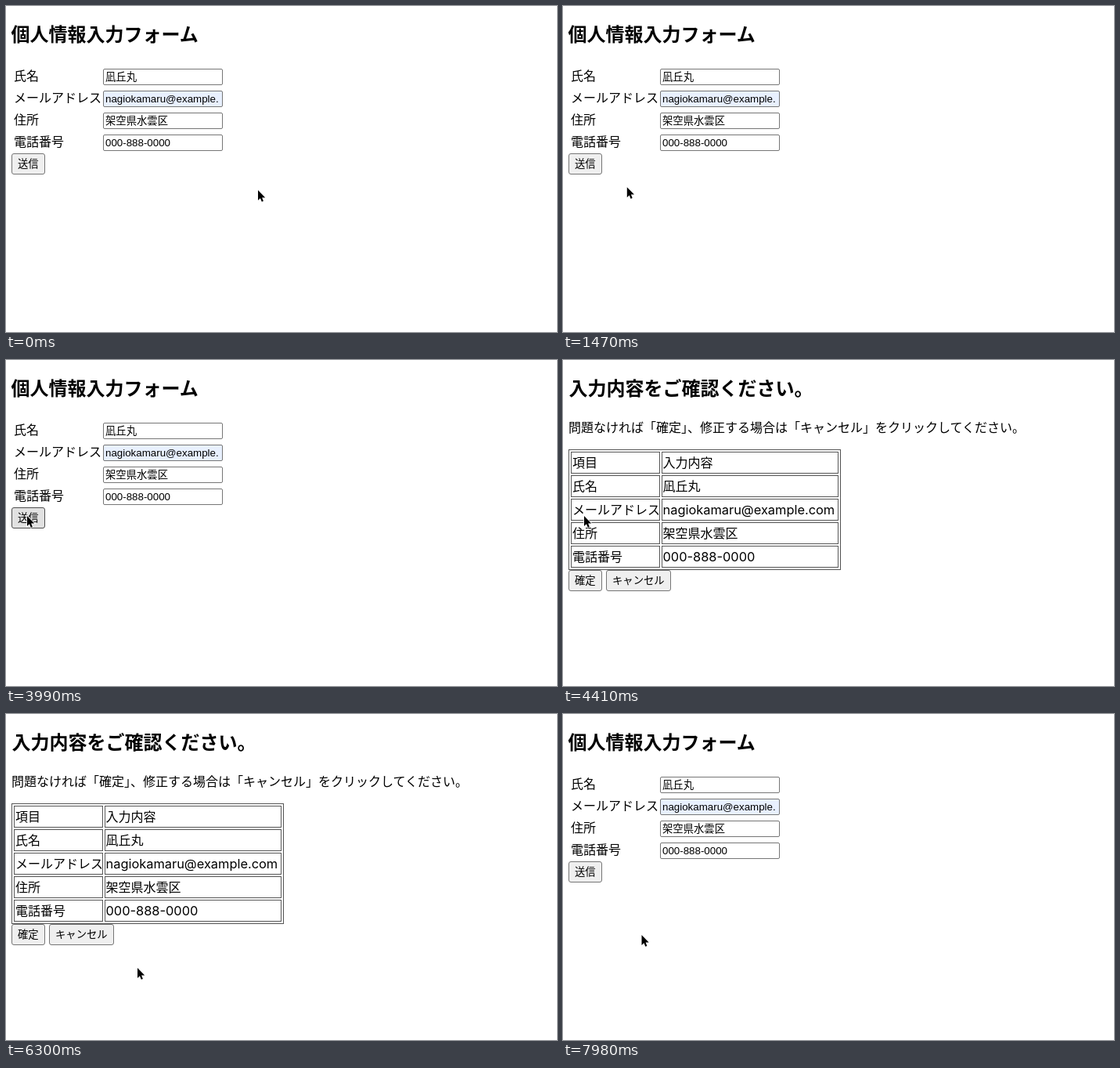
Recreate the animation shown at these times as an HTML page. Size 704 by 416 pixels, loop 8 s.

```html
<!DOCTYPE html>
<html lang="ja">
<head>
<meta charset="utf-8">
<title>個人情報入力フォーム</title>
<style>
html, body { margin: 0; width: 100%; height: 100%; overflow: hidden; background: #fff; }
svg { display: block; width: 704px; height: 416px; }
text { font: 16px "Noto Sans CJK JP", "Noto Sans CJK", sans-serif; white-space: pre; }
.h2 { font-size: 24px; font-weight: 700; }
.ui { font-size: 13.333px; }
.latin { font: 13.333px "Liberation Sans", Arial, sans-serif; }
.wide { font: 16.4px Inter, sans-serif; }
.field { fill: #fff; stroke: #767676; }
.auto { fill: #e8f0fe; }
.button { fill: #efefef; stroke: #767676; }
.hover { fill: #e9e9e9; stroke: #5c5c5c; }
.press { fill: #e1e1e1; stroke: #4f4f4f; }
.cell { fill: none; stroke: #555; }
</style>
</head>
<body>
<svg viewBox="0 0 704 416">
  <g id="form"></g>
  <g id="confirm"></g>
  <path id="cursor" d="M0 0V13L2.9 10.3L4.8 14.8L6.9 13.9L5.1 9.4H9.2Z"
        stroke="#fff" stroke-width="1.6" paint-order="stroke"/>
</svg>
<script>
const LOOP = 8000, STEP = 70;
const $ = id => document.getElementById(id);
const form = $('form'), confirm = $('confirm'), cursor = $('cursor');

function add(parent, tag, attrs, content = '') {
  const el = document.createElementNS('http://www.w3.org/2000/svg', tag);
  for (const key in attrs) el.setAttribute(key, attrs[key]);
  el.textContent = content;
  parent.append(el);
  return el;
}
const text = (parent, x, y, str, cls = '') => add(parent, 'text', { x, y, class: cls }, str);
const box = (parent, x, y, width, height, cls, rx = 0) =>
  add(parent, 'rect', { x: x + .5, y: y + .5, width: width - 1, height: height - 1, rx, class: cls });

function button(parent, x, y, label, pressAt = Infinity) {
  const width = Math.round(label.length * 13.333 + 16);
  const rect = box(parent, x, y, width, 27, 'button', 2.5);
  text(parent, x + 8, y + 18, label, 'ui');
  return { parent, rect, x, y, width, pressAt };
}

const rows = [
  ['氏名', '凪丘丸'],
  ['メールアドレス', 'nagiokamaru@example.com'],
  ['住所', '架空県水雲区'],
  ['電話番号', '000-888-0000']
];
const isLatin = str => /^[\x20-\x7e]+$/.test(str);

text(form, 6.5, 45, '個人情報入力フォーム', 'h2');
rows.forEach(([label, value], i) => {
  const y = 80 + i * 28;
  text(form, 10, y + 15, label);
  box(form, 124, y, 153, 21, i === 1 ? 'field auto' : 'field', 1.5);
  text(form, 127, y + 15, value.replace('.com', '.'), isLatin(value) ? 'latin' : 'ui');
});

text(confirm, 7.5, 45, '入力内容をご確認ください。', 'h2');
text(confirm, 7, 92, '問題なければ「確定」');
text(confirm, 159, 92, '、修正する場合は「キャンセル」をクリックしてください。');
box(confirm, 7, 114, 348, 154, 'cell');
[['項目', '入力内容'], ...rows].forEach(([label, value], i) => {
  const y = 117 + i * 30;
  box(confirm, 10, y, 114, 28, 'cell');
  box(confirm, 126, y, 226, 28, 'cell');
  text(confirm, 12, y + 20, label);
  text(confirm, 127.5, y + 20, value, isLatin(value) ? 'wide' : '');
});

const SEND = 3920, OPEN = 4130, CANCEL = 7630, CLOSE = 7770;
const buttons = [
  button(form, 7, 188, '送信', SEND),
  button(confirm, 7, 268, '確定'),
  button(confirm, 55, 268, 'キャンセル', CANCEL)
];

// pointer moves: when, where to, and the point that bends the way
const home = [322, 235];
const smooth = u => u * u * (3 - 2 * u);
const slowDown = u => u * (2 - u);
const moves = [
  { from: 0, until: 490, to: [364, 283] },
  { from: 630, until: 1960, to: [22, 201], bend: [250, 323], ease: slowDown },
  { from: 3150, until: 3290, to: [27, 199] },
  { from: 4900, until: 5670, to: [168, 324] },
  { from: 6580, until: 7350, to: [100.5, 282] }
];

function pointer(time) {
  let pos = home;
  for (const { from, until, to, bend, ease = smooth } of moves) {
    if (time < from) break;
    const s = ease(Math.min(1, (time - from) / (until - from)));
    pos = pos.map((a, k) => {
      const mid = bend ? bend[k] : (a + to[k]) / 2;
      return (1 - s) ** 2 * a + 2 * s * (1 - s) * mid + s * s * to[k];
    });
  }
  return pos;
}

function draw(now) {
  const time = Math.floor(now % LOOP / STEP) * STEP;
  const [x, y] = pointer(time);
  const page = time >= OPEN && time < CLOSE ? confirm : form;
  for (const g of [form, confirm]) g.style.display = g === page ? '' : 'none';
  for (const b of buttons) {
    const over = page === b.parent && x >= b.x && x < b.x + b.width && y >= b.y && y < b.y + 27;
    const state = !over ? '' : time >= b.pressAt ? ' press' : ' hover';
    b.rect.setAttribute('class', 'button' + state);
  }
  cursor.setAttribute('transform', `translate(${x} ${y})`);
}

const start = performance.now();
function tick() {
  draw(performance.now() - start);
  requestAnimationFrame(tick);
}
tick();
</script>
</body>
</html>
```
